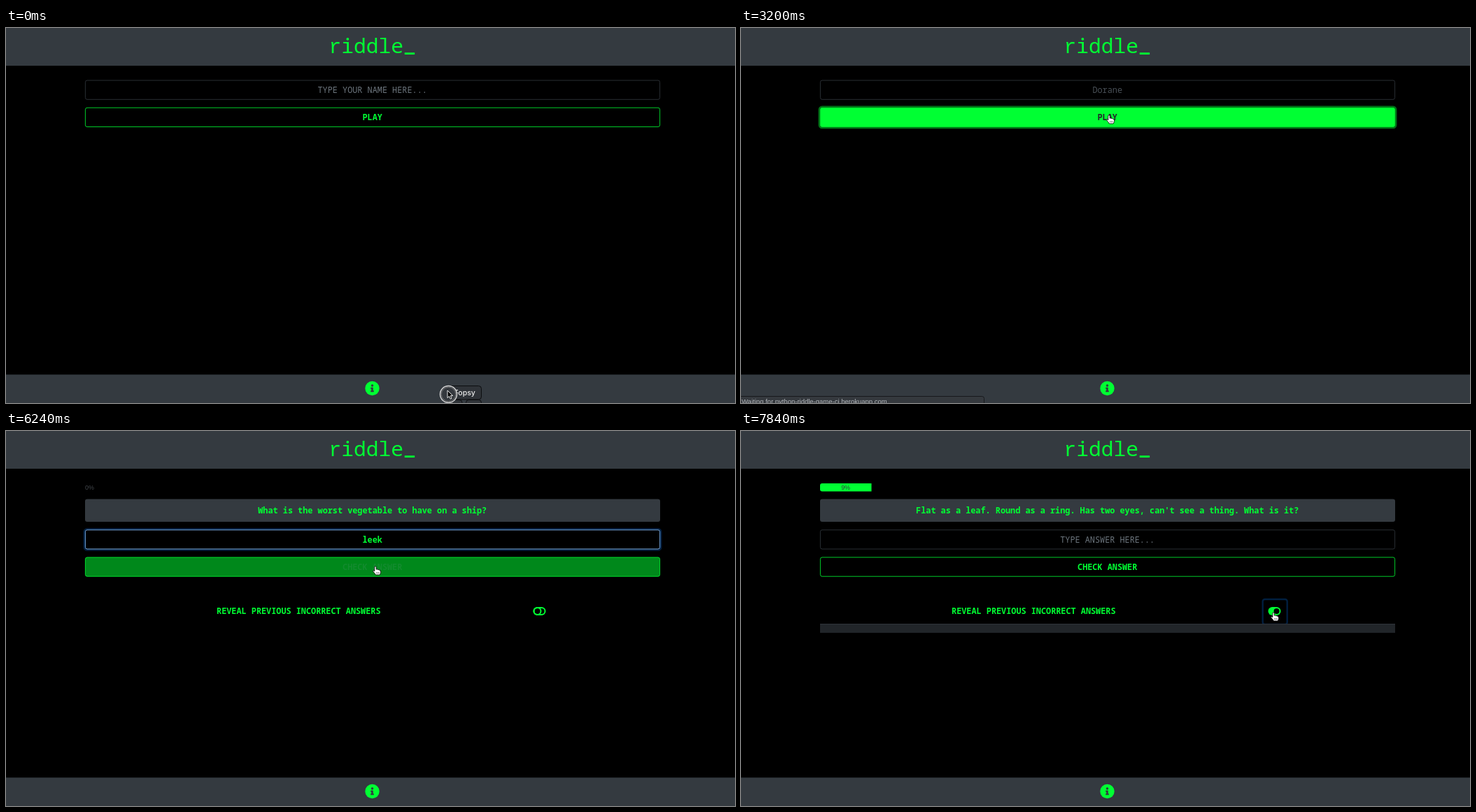
Animation of 1042x537 px, one loop 8000 ms. Source, as an HTML page:

```html
<!DOCTYPE html>
<html lang="en">
<head>
<meta charset="utf-8">
<title>riddle_</title>
<style>
  html, body { margin: 0; width: 100%; height: 100%; overflow: hidden; background: #000; }
  svg { display: block; width: 100vw; height: 100vh; }
  text { white-space: pre; }
  .mono { font: 600 11.85px "Roboto Mono", "Noto Sans Mono", monospace; text-anchor: middle; }
  .light { font-weight: 400; }
  .title { font-size: 29.6px; font-weight: 400; }
  .slab { font-family: "Liberation Mono", monospace; }
  .line { font-size: 24px; }
  .ui { font: 500 10.5px Inter, sans-serif; }
  .small { font: 8.9px "Liberation Sans", Arial, sans-serif; }
  .status { font: 9.5px "Liberation Sans", Arial, sans-serif; }
</style>
</head>
<body>
<svg id="stage" viewBox="0 0 1042 537" preserveAspectRatio="none"></svg>
<script>
const LOOP = 8000, STEP = 160, BLINK = 480, FADE = 150;
const GREEN = '#00ff33', DARK = '#343a40', MUTED = '#6c757d';
const LEFT = 113, WIDTH = 822, HEIGHT = 28.1, GAP = 11.1, MID = 523.7, CHAR = 7.11;
const NAME = 'Dorane', ANSWER = 'leek';

// Moments of the story in ms
const LIST = 1440, TYPE_NAME = 1920, PLAY = 3040, RIDDLE = 3680;
const TYPE_ANSWER = 5280, CHECK = 6560, SOLVED = 6720, TOGGLE = 7680;

const pages = [
  { input: 74.6, hint: 'TYPE YOUR NAME HERE...', label: 'PLAY' },
  { input: 141.3, hint: 'TYPE ANSWER HERE...', label: 'CHECK ANSWER' }
];
for (const page of pages) page.button = page.input + HEIGHT + GAP;

// When each state fades in and out again
const hovers = [[400, 560], [2800, 3530], [6160, 6570], [6800, 7120]];
const focuses = [[1220, 2890], [3760, 6410], [6800, 7600]];

const home = { x: 631, y: 519 };
const moves = [
  { from: 0, to: 800, x: 513, y: 86 },
  { from: 2560, to: 2880, x: 526, y: 125 },
  { from: 4160, to: 4960, x: 527, y: 170 },
  { from: 5920, to: 6240, x: 528, y: 194 },
  { from: 7040, to: TOGGLE, x: 761, y: 260 }
];

const glyphs = {
  arrow: `<path d="M0 0V10.6L2.5 8.3L4.2 12.2L6 11.4L4.4 7.6H7.7Z" fill="#000" stroke="#fff" stroke-width=".9"/>`,
  hand: `<path d="M-1.2 1a1.2 1.2 0 0 1 2.4 0v3.2q2-.8 2.4.5q1.8-.5 2.2.7q1.8-.1 1.7 1.6v1.6q-.2 2-1.3 3.4H.4q-1.6-2.8-4-5.2q.2-1.6 1.6-.8l.8.8z" fill="#fff" stroke="#000" stroke-width=".8"/>
    <path d="M1.6 8v2.4M3.4 8v2.4M5.1 8v2.4" stroke="#000" stroke-width=".5"/>`,
  beam: `<path d="M-3-6q3 0 3 2v8q0 2-3 2M3-6q-3 0-3 2M3 6q-3 0-3-2M-1.5 1.5h3" fill="none" stroke="#a5a5a5" stroke-width="1.2"/>`
};

const lerp = (a, b, p) => a + (b - a) * p;
const progress = (t, from, to) => Math.min(1, Math.max(0, (t - from) / (to - from)));
const easeOut = p => 1 - (1 - p) ** 3;
const between = (v, from, to) => v >= from && v < to;
const fade = (t, spans) => Math.max(...spans.map(([on, off]) =>
  progress(t, on, on + FADE) - progress(t, off, off + FADE)));

// Typing starts slowly and speeds up
function typing(word, t, start, end) {
  if (t < start) return '';
  return word.slice(0, Math.max(1, Math.ceil(word.length * progress(t, start, end) ** 2)));
}

const text = (content, x, y, fill, cls = 'mono') =>
  `<text x="${x}" y="${y}" fill="${fill}" class="${cls}">${content}</text>`;
const rect = (x, y, w, h, fill, stroke = 'none', extra = 'rx="3"') =>
  `<rect x="${x}" y="${y}" width="${w}" height="${h}" fill="${fill}" stroke="${stroke}" ${extra}/>`;
const outline = (y, grow, fill, stroke, extra) =>
  rect(LEFT - grow, y - grow, WIDTH + 2 * grow, HEIGHT + 2 * grow, fill, stroke, extra);
const box = (y, fill, stroke, opacity = 1) =>
  outline(y, -.4, fill, stroke, `rx="2.6" stroke-width=".8" opacity="${opacity}"`);
const halo = (y, color, opacity) =>
  outline(y, 1.2, 'none', color, `rx="4.2" stroke-width="2.4" opacity="${opacity}"`);

function pointer(t, page, onRiddle) {
  let { x, y } = home;
  for (const move of moves) {
    const p = easeOut(progress(t, move.from, move.to));
    x = lerp(x, move.x, p);
    y = lerp(y, move.y, p);
  }
  let kind = 'arrow';
  if (between(y, page.input, page.input + HEIGHT)) kind = 'beam';
  if (between(y, page.button, page.button + HEIGHT)) kind = 'hand';
  if (onRiddle && between(x, 752, 772) && between(y, 250, 266)) kind = 'hand';
  return `<g transform="translate(${x} ${y})">${glyphs[kind]}</g>`;
}

function frame() {
  return rect(0, 0, 1042, 54, DARK, 'none', '') + rect(0, 496.3, 1042, 41, DARK, 'none', '') +
    text('<tspan class="slab">r</tspan>iddle', 514.8, 35.6, GREEN, 'mono title') +
    text('_', 577, 34.4, GREEN, 'mono line') +
    `<circle cx="523.5" cy="516" r="10.2" fill="${GREEN}"/><circle cx="523.5" cy="512" r="1.75" fill="${DARK}"/>
     <path d="M521.2 514.7h3.6v4.6h1v2h-4.6v-2h1v-2.6h-1z" fill="${DARK}"/>`;
}

function input(t, page, typed) {
  const y = page.input, base = y + 18.3, focus = fade(t, focuses);
  let out = box(y, '#000', DARK) + halo(y, '#007bff', .25 * focus) + box(y, 'none', '#80bdff', focus);
  if (typed) out += text(typed, MID, base, focus ? GREEN : '#495057', focus ? 'mono' : 'mono light');
  else out += text(page.hint, MID, base, MUTED, 'mono light');
  if (focus && t % (2 * BLINK) < BLINK) {
    out += rect(MID + typed.length * CHAR / 2 + .3, y + 6, 1, 16, GREEN, 'none', '');
  }
  return out;
}

function button(t, page, pressed) {
  const hover = fade(t, hovers);
  const ink = [[0, 33], [255, 37], [51, 41]].map(([a, b]) => Math.round(lerp(a, b, hover)));
  return (pressed ? halo(page.button, GREEN, .45) : '') +
    box(page.button, `rgba(0,255,51,${hover})`, GREEN) +
    text(page.label, MID, page.button + 18.3, `rgb(${ink})`);
}

function suggestions(typed) {
  const names = [NAME, NAME.toLowerCase(), 'player', 'test', 'hello', 'guest'].slice(0, typed ? 2 : 6);
  return rect(112.5, 103.5, 142, 11.4 + 26.8 * names.length, '#292a2d') +
    names.map((name, i) => text(name, 121.5, 127 + 26.8 * i, '#e8eaed', 'ui')).join('');
}

function riddle(t) {
  const solved = t >= SOLVED;
  const question = solved
    ? "Flat as a leaf. Round as a ring. Has two eyes, can't see a thing. What is it?"
    : 'What is the worst vegetable to have on a ship?';
  const score = solved
    ? `<path d="M186.5 75v11.5H116a3 3 0 0 1-3-3V78a3 3 0 0 1 3-3z" fill="${GREEN}"/>` +
      text('9%', 143.2, 84, DARK, 'small')
    : text('0%', LEFT, 84, '#42474c', 'small');
  const toggle = t >= TOGGLE
    ? rect(745.7, 241, 35, 36, 'none', '#001f40', 'rx="3" stroke-width="2.4"') +
      rect(753.5, 252, 18, 12, GREEN, 'none', 'rx="6"') + '<circle cx="765.5" cy="258" r="4"/>'
    : `<g fill="none" stroke="${GREEN}" stroke-width="2"><rect x="754.5" y="253" width="16" height="10" rx="5"/>
       <circle cx="759.5" cy="258" r="5"/></g>`;
  const panel = 13 * progress(t, TOGGLE, TOGGLE + STEP);
  return score + rect(LEFT, 97.5, WIDTH, 32.5, DARK) + text(question, MID, 118.3, GREEN) +
    text('REVEAL PREVIOUS INCORRECT ANSWERS', 418.3, 262.4, GREEN) + toggle +
    (panel ? rect(LEFT, 276, WIDTH, panel, '#212529', 'none', '') +
      rect(LEFT, 276, WIDTH, .8, '#32383e', 'none', '') : '');
}

function dockLabel() {
  const edge = '#0c0d0f', fill = '#2f3338';
  return rect(631.5, 512.5, 48, 19.5, fill, edge, 'rx="4"') + rect(636, 532.5, 16, 12, fill, edge, 'rx="4"') +
    rect(657.5, 532.5, 22, 12, fill, edge, 'rx="4"') + text('Fopsy', 640.5, 525.8, '#eee', 'ui') +
    '<circle cx="632.5" cy="524.5" r="12" fill="#34383d" stroke="#d8d8d8" stroke-width="1.4"/>' +
    '<circle cx="632.5" cy="524.5" r="10.2" fill="none" stroke="#888" stroke-width=".8"/>';
}

function statusBar() {
  return rect(-4, 527.5, 351.5, 16, '#35393e', '#17191c') +
    text('Waiting for python-riddle-game-ci.herokuapp.com...', 1, 538, '#b4b8bc', 'status');
}

function draw(t) {
  const onRiddle = t >= RIDDLE;
  const page = pages[+onRiddle];
  const loading = between(t, PLAY, RIDDLE), checking = between(t, CHECK, SOLVED);
  let typed = typing(NAME, t, TYPE_NAME, 2720);
  if (onRiddle) typed = t < SOLVED ? typing(ANSWER, t, TYPE_ANSWER, 5760) : '';

  let out = rect(0, 0, 1042, 537, '#000', 'none', '') + frame();
  if (onRiddle) out += riddle(t);
  out += input(t, page, typed) + button(t, page, loading || checking);
  if (between(t, LIST, 2720)) out += suggestions(typed);
  if (t < STEP) out += dockLabel();
  if (loading) out += statusBar();
  if (!between(t, TYPE_ANSWER, 6080)) out += pointer(t, page, onRiddle);
  return out;
}

const stage = document.getElementById('stage');
const begin = performance.now();
let shown = -1;

function tick() {
  const time = (performance.now() - begin) % LOOP;
  const step = Math.floor(time / STEP) * STEP;
  if (step !== shown) {
    shown = step;
    stage.innerHTML = draw(step);
  }
  requestAnimationFrame(tick);
}
tick();
</script>
</body>
</html>
```
